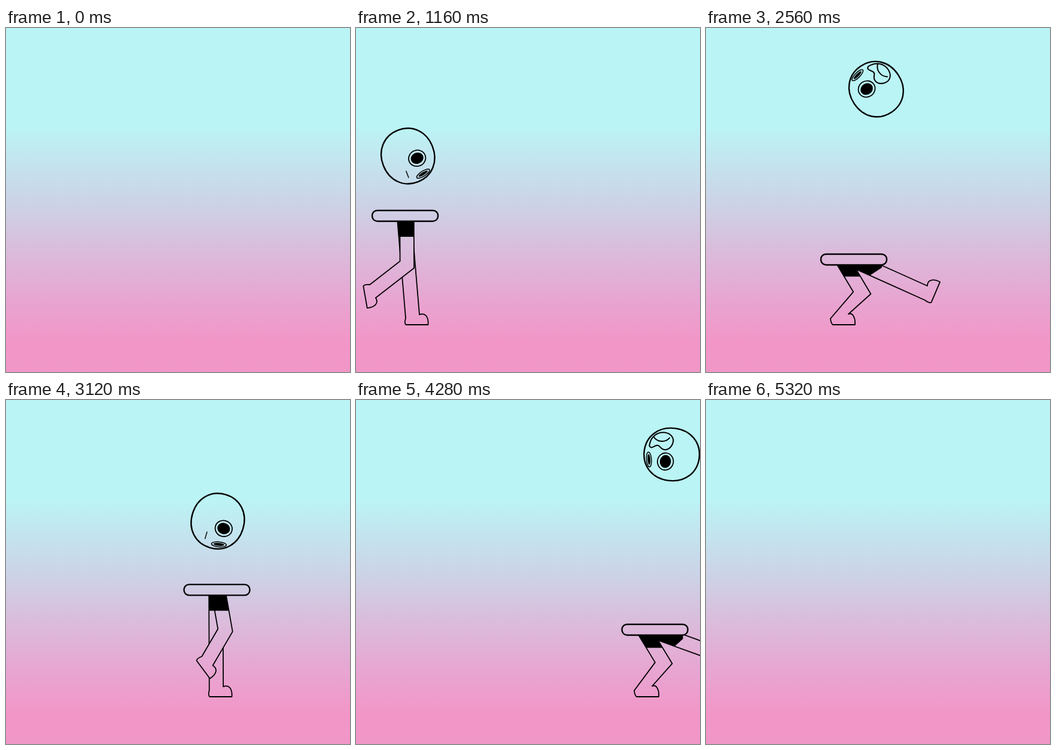
An HTML page with a canvas that plays this animation: 575x575 px, repeating every 5640 ms.

```html
<!DOCTYPE html>
<html>
<head>
<meta charset="utf-8">
<style>
html, body { margin: 0; width: 100%; height: 100%; overflow: hidden; background: #bbf4f5; }
canvas { display: block; width: 575px; height: 575px; }
</style>
</head>
<body>
<canvas id="stage" width="575" height="575"></canvas>
<script>
const ctx = document.getElementById('stage').getContext('2d');
const LOOP = 5640, ENTER = 160, EXIT = 5320, TICK = 40;
const STEP = 940, STRIDE = 128.5;   // one step: ms and pixels
const LEG_HALF = 11.7, THIGH = 54.5, HEAD_REST = 59;

const sky = ctx.createLinearGradient(0, 0, 0, 575);
[[0, '#bbf4f5'], [165, '#bbf4f5'], [245, '#c6dfec'], [300, '#cdd1e5'], [375, '#dbbbdb'],
 [450, '#e7a6d2'], [525, '#f296c7'], [575, '#f197c8']].forEach(([y, c]) => sky.addColorStop(y / 575, c));

const clamp01 = v => Math.max(0, Math.min(1, v));
const bell = (v, centre, width) => Math.exp(-(((v - centre) / width) ** 2));
const along = (p, d, s) => [p[0] + d[0] * s, p[1] + d[1] * s];
const dot = (a, b) => a[0] * b[0] + a[1] * b[1];
const normal = d => [d[1], -d[0]];
function unit(a, b) {
  const x = b[0] - a[0], y = b[1] - a[1], l = Math.hypot(x, y) || 1;
  return [x / l, y / l];
}

// A swinging ankle: time in the step, x from the step's start, y, foot angle.
const swing = [
  [60, -48.5, 482, 0],    // lift
  [300, 13.5, 440, 80],   // trail
  [600, 220, 431, -72],   // kick
  [760, 225, 443, -67],
  [940, 221.5, 469, -44], // drop
  [1080, 208.5, 482, 0]   // land
];

// Monotone cubic through the key points, level at both ends.
function follow(keys, time) {
  const last = keys.length - 1;
  const t = Math.max(keys[0][0], Math.min(keys[last][0], time));
  let i = 0;
  while (i < last - 1 && keys[i + 1][0] <= t) i++;
  const rate = (n, c) => (keys[n + 1][c] - keys[n][c]) / (keys[n + 1][0] - keys[n][0]);
  const slope = (n, c) => {
    if (n === 0 || n === last) return 0;
    const l = rate(n - 1, c), r = rate(n, c);
    return l * r <= 0 ? 0 : 2 * l * r / (l + r);
  };
  const span = keys[i + 1][0] - keys[i][0], u = (t - keys[i][0]) / span;
  return [1, 2, 3].map(c => {
    const from = keys[i][c], d = keys[i + 1][c] - from;
    const m1 = slope(i, c) * span, m2 = slope(i + 1, c) * span;
    return from + u * (m1 + u * (3 * d - 2 * m1 - m2 + u * (m1 + m2 - 2 * d)));
  });
}

// The bar rises over the planted foot and sinks, slowing, into the kick.
function bodyAt(s, start) {
  const a = 2 * Math.PI * s / STEP;
  return {
    x: start + STRIDE * s / STEP + 8.5 * Math.sin(a) + 13.9 * (1 - Math.cos(a)) + 1.2 * Math.sin(2 * a),
    y: 358.1 - 32.8 * Math.sin(a) + 14.9 * Math.cos(a) + 10.6 * Math.sin(2 * a)
  };
}

// One high toss and one small bounce in every two steps, two full turns in all.
function headAt(p, bar) {
  const part = p / (2 * STEP);
  return {
    x: bar.x - 2 + 39.5 * bell(p, 780, 346),
    y: Math.min(bar.y - HEAD_REST, 89 + 0.001 * (p - 645) ** 2, 202 + 0.0012 * (p - 1340) ** 2),
    turn: 4 * Math.PI * part - Math.PI / 3 * Math.sin(Math.PI * part) ** 2
  };
}

function legPath(hip, ankle, angle, lift) {
  const a = angle * Math.PI / 180, c = Math.cos(a), s = Math.sin(a);
  const foot = (x, y) => [ankle[0] + x * c - y * s, ankle[1] + x * s + y * c];
  const reach = Math.hypot(ankle[0] - hip[0], ankle[1] - hip[1]) / 2;
  const bend = Math.sqrt(Math.max(0, THIGH ** 2 - reach ** 2)) + lift;
  const axis = unit(hip, ankle);
  const knee = along(along(hip, axis, reach), normal(axis), bend);

  const thigh = unit(hip, knee), shin = unit(knee, ankle);
  const n1 = normal(thigh), n2 = normal(shin);
  const miter = LEG_HALF / Math.max(0.4, 1 + dot(n1, n2));
  const fold = [(n1[0] + n2[0]) * miter, (n1[1] + n2[1]) * miter];
  const cuff = [c + 0.25 * s, s - 0.25 * c];
  const cuffHalf = LEG_HALF / Math.max(0.78, dot(n2, cuff));
  const top = along(hip, thigh, -14);

  const path = new Path2D();
  path.moveTo(...along(top, n1, LEG_HALF));
  path.lineTo(...along(knee, fold, 1));
  path.lineTo(...along(ankle, cuff, cuffHalf));
  path.bezierCurveTo(...foot(22, -7), ...foot(27, 2), ...foot(26, 14));
  path.lineTo(...foot(-11, 14));
  path.quadraticCurveTo(...foot(-14, 12), ...along(ankle, cuff, -cuffHalf));
  path.lineTo(...along(knee, fold, -1));
  path.lineTo(...along(top, n1, -LEG_HALF));
  return path;
}

function drawLeg(swinging, s, start, bar) {
  const [fx, fy, angle] = follow(swing, swinging ? s : s + STEP);
  const ankle = [start + fx - (swinging ? 0 : STRIDE), fy];
  const base = bar.y + 9;
  const side = (swinging ? 1 : -1) * (2 * clamp01(s / 300) - 1);
  const spread = 2 + 0.18 * (bar.y - 314);
  const lift = swinging ? 32 * bell(s, 300, 120) : 0;
  const path = legPath([bar.x + 1 + side * spread, base], ankle, angle, lift);

  ctx.save();
  ctx.beginPath();
  ctx.rect(bar.x - 400, base, 800, 300);
  ctx.clip();
  ctx.fillStyle = sky;
  ctx.fill(path);
  ctx.lineWidth = 1.8;
  ctx.stroke(path);

  // Shorts: cut level, with the corner taken off in a crouch.
  const crouch = Math.max(0, bar.y - 376) * 0.6;
  const cut = 26 - crouch, half = 47;
  ctx.beginPath();
  ctx.moveTo(bar.x - half, base);
  ctx.lineTo(bar.x + half, base);
  ctx.lineTo(bar.x + half, base + cut - Math.min(15, crouch * 4));
  ctx.lineTo(bar.x + half - crouch * 3.5, base + cut);
  ctx.lineTo(bar.x - half, base + cut);
  ctx.clip();
  ctx.fillStyle = '#000';
  ctx.fill(path);
  ctx.restore();
}

function drawBar({ x, y }) {
  ctx.lineWidth = 2.4;
  ctx.beginPath();
  ctx.roundRect(x - 55, y - 9, 110, 18, 8.5);
  ctx.stroke();
}

function drawEye(x, rx, ry, pupilX, pupilY, tilt) {
  ctx.beginPath();
  ctx.ellipse(x, -13, rx, ry, tilt, 0, Math.PI * 2);
  ctx.stroke();
  ctx.beginPath();
  ctx.ellipse(x, -13, pupilX, pupilY, tilt, 0, Math.PI * 2);
  ctx.fill();
}

function drawOpenMouth() {
  ctx.lineWidth = 2;
  ctx.beginPath();
  ctx.moveTo(39, 10);
  ctx.bezierCurveTo(38, 44, -6, 40, 1, 17);
  ctx.bezierCurveTo(5, 5, 15, 4, 21, 10);
  ctx.bezierCurveTo(28, 18, 34, 1, 39, 10);
  ctx.moveTo(34, 26);
  ctx.bezierCurveTo(27, 17, 13, 18, 7, 27);
  ctx.stroke();
}

function drawHead({ x, y, turn }) {
  const rx = 46.3, ry = 44, k = 0.585;
  ctx.save();
  ctx.translate(x, y);
  ctx.rotate(turn);
  ctx.lineWidth = 2.4;
  ctx.beginPath();
  ctx.moveTo(rx, 0);
  ctx.bezierCurveTo(rx, ry * k, rx * k, ry, 0, ry);
  ctx.bezierCurveTo(-rx * k, ry, -rx, ry * k, -rx, 0);
  ctx.bezierCurveTo(-rx, -ry * k, -rx * k, -ry, 0, -ry);
  ctx.bezierCurveTo(rx * k, -ry, rx, -ry * k, rx, 0);
  ctx.stroke();
  ctx.fillStyle = '#000';
  ctx.lineWidth = 1.8;
  drawEye(9, 13.3, 14.3, 9.3, 10.8, 0);
  ctx.lineWidth = 1.5;
  drawEye(36.7, 4.2, 12.5, 2.4, 9, -0.2);
  if (y < 200) {
    drawOpenMouth();
  } else {
    ctx.beginPath();
    ctx.moveTo(22.5, 12);
    ctx.lineTo(34, 12);
    ctx.stroke();
  }
  ctx.restore();
}

function draw(t) {
  ctx.fillStyle = sky;
  ctx.fillRect(0, 0, 575, 575);
  if (t < ENTER || t >= EXIT) return;

  let clock = t + 2 * TICK;
  const p = clock % (2 * STEP);
  if (p < 4 * TICK) clock -= p % (2 * TICK); // the landing is held on twos
  const step = Math.floor(clock / STEP), s = clock % STEP;
  const start = 143 + STRIDE * (step - 2);
  const bar = bodyAt(s, start), nearSwings = step % 2 === 1;

  ctx.strokeStyle = '#000';
  ctx.lineCap = ctx.lineJoin = 'round';
  drawLeg(!nearSwings, s, start, bar);
  drawLeg(nearSwings, s, start, bar);
  drawBar(bar);
  drawHead(headAt(clock % (2 * STEP), bar));
}

const begin = performance.now();
function tick() {
  const t = (performance.now() - begin) % LOOP;
  draw(Math.floor(t / TICK) * TICK);
  requestAnimationFrame(tick);
}
tick();
</script>
</body>
</html>
```
